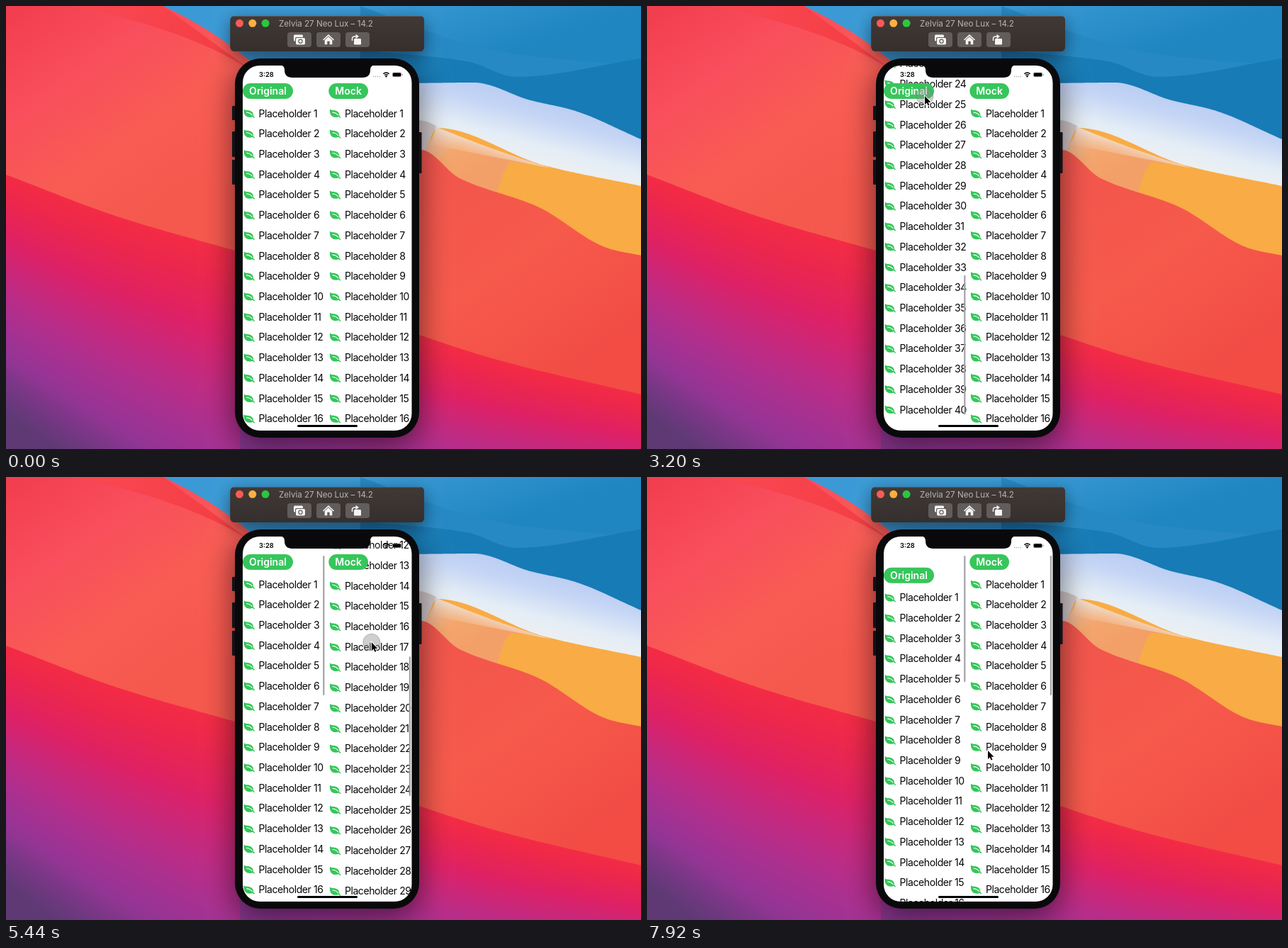
These frames come from a looping animation (896 by 625 pixels, 8 s). An HTML page with a canvas:

```html
<!DOCTYPE html>
<html lang="en">
<head>
<meta charset="utf-8">
<title>Scrolling lists</title>
<style>
html, body { margin: 0; width: 100%; height: 100%; overflow: hidden; }
canvas { display: block; }
</style>
</head>
<body>
<canvas id="stage" width="896" height="625"></canvas>
<script>
const W = 896, H = 625, LOOP = 8000;
const ROW = 28.72, ROWS = 40, MAX = 702;
const FONT = 'Inter, Roboto, sans-serif';
const GREEN = '#36c65b', BLACK = '#09090b';
const stage = document.getElementById('stage');
const backdrop = document.createElement('canvas');
backdrop.width = W;
backdrop.height = H;
let c;

// Smooth monotone curve through [x, y] points, constant outside them.
function curve(...keys) {
  const last = keys.length - 1;
  const slope = i => (keys[i + 1][1] - keys[i][1]) / (keys[i + 1][0] - keys[i][0]);
  const tangent = i => {
    if (i === 0) return slope(0);
    if (i === last) return slope(last - 1);
    const a = slope(i - 1), b = slope(i);
    return a * b <= 0 ? 0 : 2 * a * b / (a + b);
  };
  return x => {
    if (x <= keys[0][0]) return keys[0][1];
    if (x >= keys[last][0]) return keys[last][1];
    const i = keys.findIndex(k => k[0] >= x) - 1;
    const [x0, a] = keys[i], [x1, b] = keys[i + 1];
    const d = x1 - x0, u = (x - x0) / d, w = 1 - u;
    return a * w * w * (1 + 2 * u) + b * u * u * (3 - 2 * u)
      + d * u * w * (tangent(i) * w - tangent(i + 1) * u);
  };
}

// ---- drawing helpers ----
function box(x, y, w, h, r, fill) {
  c.beginPath();
  c.roundRect(x, y, w, h, r);
  c.fillStyle = fill;
  c.fill();
}
function disc(x, y, r, fill) {
  c.beginPath();
  c.arc(x, y, r, 0, 7);
  c.fillStyle = fill;
  c.fill();
}
function shape(d, fill) {
  c.fillStyle = fill;
  c.fill(new Path2D(d));
}
function line(d, color, width) {
  c.strokeStyle = color;
  c.lineWidth = width;
  c.stroke(new Path2D(d));
}
function text(s, x, y, font, fill, spacing = 0) {
  c.font = font + ' ' + FONT;
  c.letterSpacing = spacing + 'px';
  c.fillStyle = fill;
  c.fillText(s, x, y);
}
function ramp(x0, y0, x1, y1, ...colors) {
  const g = c.createLinearGradient(x0, y0, x1, y1);
  colors.forEach((color, i) => g.addColorStop(i / (colors.length - 1), color));
  return g;
}
function shadow(blur, dy, alpha) {
  c.shadowBlur = blur;
  c.shadowOffsetY = dy;
  c.shadowColor = `rgba(10,5,15,${alpha})`;
}

// ---- wallpaper ----
// Fills everything below a curve.
function below(fill, ...points) {
  const y = curve(...points), x0 = points[0][0], x1 = points[points.length - 1][0];
  c.beginPath();
  c.moveTo(x0, H);
  for (let x = x0; x < x1; x += 4) c.lineTo(x, y(x));
  c.lineTo(x1, y(x1));
  c.lineTo(x1, H);
  c.fillStyle = fill;
  c.fill();
}

// Crimson to violet, in sheets that drop by gap0 (left) to gap1 (right) per step.
function sheets(gap0, gap1, ...points) {
  const x0 = points[0][0], width = points[points.length - 1][0] - x0;
  for (let i = 0; i <= 7; i += .1) {
    const u = i / 7;
    const color = `hsl(${352 - 75 * u ** 1.3} ${89 - 55 * u}% ${56 - 22 * u}%)`;
    below(color, ...points.map(([x, y]) => [x, y + i * (gap0 + (gap1 - gap0) * (x - x0) / width)]));
  }
}

function drawWallpaper() {
  box(0, 0, W, H, 0, ramp(30, 0, 230, 290, '#f23f50', '#f94e5d', '#f85c53', '#f5584c'));
  shape('M90 0H222L345 90Q250 30 90 0Z', ramp(120, 0, 300, 100, '#f94752', '#f43d42'));
  sheets(48, 64, [0, 238], [160, 298], [330, 347]);

  shape('M222 0Q290 32 345 78L586 200H896V0Z', ramp(500, 0, 540, 120, '#3b9ad5', '#1f86c1'));
  below('#2689c4', [500, 0], [640, 50], [735, 70], [896, 84]);
  below('#177bb5', [500, 62], [650, 78], [720, 100], [896, 74]);
  below(ramp(720, 108, 690, 220, '#b5caf2', '#c5d5f5', '#e4edf6', '#f0f1f0'),
    [570, 109], [660, 108], [740, 133], [800, 147], [896, 188]);
  shape('M570 160Q596 160 610 172L596 210H570Z', '#d0c6c6');
  below('#f9ab45', [592, 204], [608, 172], [760, 225], [896, 254]);
  shape('M592 204L608 172Q680 204 755 224L712 220Q700 232 692 270H592Z',
    ramp(600, 180, 640, 245, '#ecc1a8', '#f4a66d', '#f3a068'));
  shape('M606 170Q690 205 770 229L602 196Z',
    ramp(640, 180, 632, 204, 'rgba(240,236,232,.8)', 'rgba(245,190,145,.4)'));
  below(ramp(600, 230, 800, 520, '#f2554b', '#f65a4b', '#f24c45'),
    [330, 200], [586, 203], [640, 243], [750, 283], [850, 342], [896, 352]);
  sheets(44, 32, [330, 370], [586, 465], [700, 501], [896, 548]);
}

// ---- window and phone ----
function drawToolbar() {
  shadow(24, 7, .5);
  box(316.5, 14, 273.5, 50, 6, '#39322f');
  shadow(0, 0, 0);
  box(316.5, 14, 273.5, 50, 6, ramp(0, 14, 0, 64, '#403936', '#352f2d'));
  box(320, 14, 266, .8, 0, '#66605e');
  ['#fc5b55', '#fdb03f', '#2bc741'].forEach((color, i) => disc(329.5 + i * 18.3, 24.3, 5.5, color));
  text('Zelvia 27 Neo Lux – 14.2', 385, 28.5, '11.6px', '#b9b5b4');

  const ink = '#f5f4f4', hole = '#625c5b';
  for (let i = 0; i < 3; i++) box(397 + i * 41, 37, 34, 21, 4, hole);

  // camera
  box(406, 40.5, 13, 9, 1.5, ink);
  box(408, 44, 14.5, 11, 2, hole);
  box(409, 45, 13, 9.5, 1.8, ink);
  disc(415.5, 49.7, 3.2, hole);
  disc(415.5, 49.7, 2, ink);
  // house
  line('M447.5 48L455 41.2L462.5 48', ink, 1.6);
  shape('M449.7 48L455 43.3L460.3 48V54.3H456.7V49.8H453.3V54.3H449.7Z', ink);
  // rotate
  box(491, 46, 10, 8.5, 1.2, ink);
  line('M488.5 49V46Q488.5 43 492 43H495', ink, 1.5);
  shape('M493.5 39.7L498 43L493.5 46.3Z', ink);
}

function drawPhone() {
  for (const [x, y, h] of [[319, 141, 20], [319, 177, 36], [319, 217, 35], [582, 178, 58]]) {
    box(x, y, 4.5, h, 1.2, '#17161a');
  }
  shadow(44, 12, .6);
  box(323, 74, 260, 535, 36, BLACK);
  shadow(0, 0, 0);
}

// ---- motion ----
const fade = (t, start, end) => Math.max(0, Math.min(1, (t - start) / 150, (end - t) / 300));

const columns = [
  {
    title: 'Original', x: 334, pill: 71, barX: 447.2,
    scroll: curve([1900, 0], [2400, 430], [2640, 553.7], [3050, MAX], [3200, MAX], [3780, -60],
      [3840, -47], [4250, 0], [6950, 0], [7200, 140], [7300, 140], [7690, -52], [7920, -18.7], [8200, 0]),
    bar: t => Math.max(fade(t, 1900, 6500), fade(t, 6950, 9000))
  },
  {
    title: 'Mock', x: 455.3, pill: 55.7, barX: 568.8,
    scroll: curve([5100, 0], [5900, MAX], [5970, MAX], [6520, -45], [6800, -5], [6950, 0]),
    bar: t => fade(t, 5100, 9000)
  }
];

// Pointer positions as [time, x, y].
const path = [[1200, 470, 590], [1900, 398, 560], [2400, 392, 127], [3200, 392, 127], [3640, 404, 569],
  [3900, 404, 569], [4800, 499, 419], [5100, 511, 560], [5500, 516, 212], [6000, 516, 212],
  [6320, 512, 540], [6800, 416, 286], [7200, 410, 190], [7580, 414, 470], [7920, 481, 386]];
const pointerX = curve(...path.map(([t, x]) => [t, x]));
const pointerY = curve(...path.map(([t, , y]) => [t, y]));
const presses = [1950, 3200, 5100, 5930, 6900, 7250], PRESS = 400;

function drawLeaf(x, y) {
  c.save();
  c.translate(x, y);
  shape('M.7 -6C3.5 -3.4 8.5 -5.6 12 -2.2C14 -.2 14.5 2.4 13.6 4.4C9 6.6 -.6 6.2 .7 -6Z', GREEN);
  line('M4.2 -1.4Q9.5 -1.4 13 3.2', '#fff', 1.1);
  line('M12.4 2.8L15.6 6', GREEN, 1.5);
  c.restore();
}

function drawColumn(col, t) {
  const s = col.scroll(t), over = Math.max(0, -s);
  for (let i = 0; i < ROWS; i++) {
    const y = 151.5 + i * ROW - s;
    drawLeaf(col.x + 1, y);
    text('Placeholder ' + (i + 1), col.x + 22.6, y + 5, '14px', '#050505', -.42);
  }
  c.globalAlpha = col.bar(t);
  box(col.barX, 111 + Math.max(0, s) * .383, 2.2, 197 - over, 1.1, '#a3a3a5');
  c.globalAlpha = 1;
  box(col.x, 109 + over, col.pill, 22, 11, GREEN);
  c.textAlign = 'center';
  text(col.title, col.x + col.pill / 2, 125.2 + over, '600 14px', '#fff');
  c.textAlign = 'left';
}

function drawStatus() {
  shape('M386 83H521Q514 84 514 90Q514 101 503 101H404Q393 101 393 90Q393 84 386 83Z', BLACK);
  text('3:28', 357, 100.3, '600 9.3px', '#000');
  for (let i = 0; i < 4; i++) disc(518.8 + i * 2.8, 99.6, .8, '#aaa');
  disc(536.5, 99.3, 1.2, '#000');
  line('M534 97.6Q536.5 95.5 539 97.6M532.3 95.8Q536.5 92.2 540.7 95.8', '#000', 1.3);
  box(545, 93.7, 13, 6.4, 2, '#8a8a8a');
  box(546, 94.6, 11, 4.6, 1.2, '#000');
  box(558.6, 95.7, 1, 2.4, .5, '#8a8a8a');
  box(411, 591, 85, 3, 1.5, '#000');
}

function drawPointer(t) {
  if (t < path[0][0]) return;
  c.save();
  c.translate(pointerX(t), pointerY(t));
  if (presses.some(p => t >= p && t < p + PRESS)) {
    disc(0, 0, 12, 'rgba(140,140,140,.42)');
    c.strokeStyle = 'rgba(110,110,110,.5)';
    c.lineWidth = .8;
    c.stroke();
  }
  const arrow = 'M0 0V12L2.8 9.4L4.6 13.6L6.5 12.8L4.7 8.8H8.5Z';
  line(arrow, '#fff', 1.8);
  shape(arrow, '#000');
  c.restore();
}

function draw(t) {
  c.drawImage(backdrop, 0, 0);
  c.save();
  c.beginPath();
  c.roundRect(334, 84, 238.5, 515, 24);
  c.fillStyle = '#fff';
  c.fill();
  c.clip();
  columns.forEach(col => drawColumn(col, t));
  drawStatus();
  c.restore();
  drawPointer(t);
}

c = backdrop.getContext('2d');
drawWallpaper();
drawPhone();
drawToolbar();
c = stage.getContext('2d');

let start;
function tick(now) {
  start ??= now;
  draw((now - start) % LOOP);
  requestAnimationFrame(tick);
}
draw(0);
requestAnimationFrame(tick);
</script>
</body>
</html>
```
